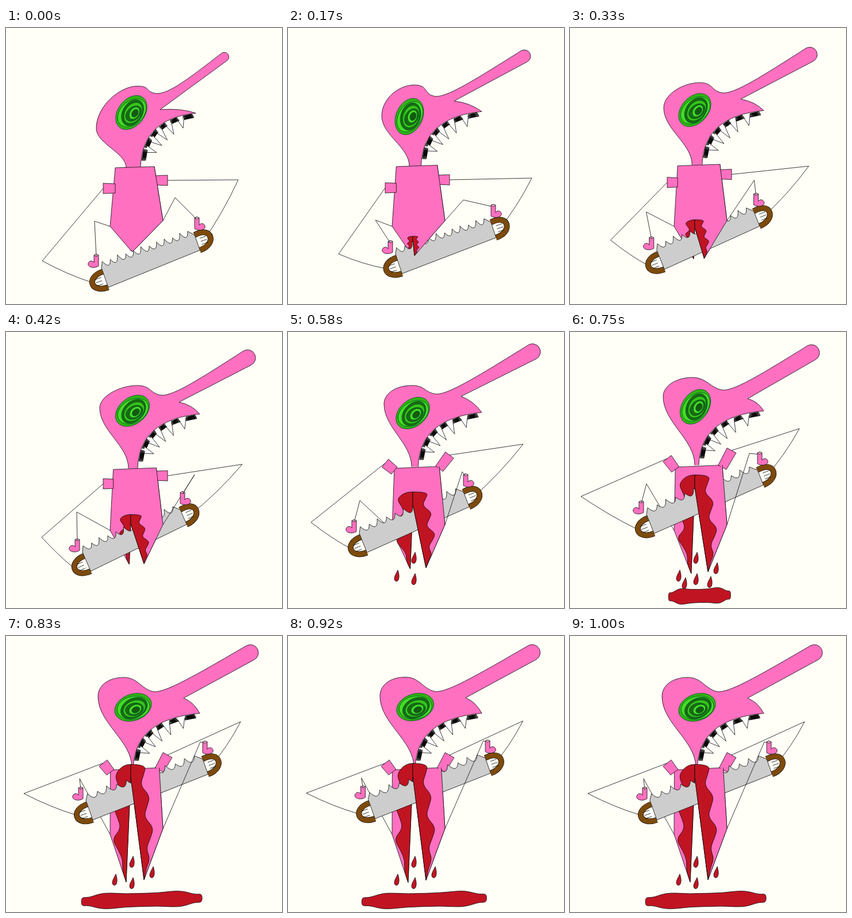
Write an HTML page that moves like this. It is 480x480 px and loops after 1.08 s.

```html
<!DOCTYPE html>
<html lang="en">
<head>
<meta charset="utf-8">
<title>Saw</title>
<style>
html, body { margin: 0; width: 100%; height: 100%; overflow: hidden; background: #fffff7; }
svg { display: block; width: 100vw; height: 100vh; }
path { stroke-linejoin: round; }
</style>
</head>
<body>
<svg id="stage" viewBox="0 0 480 480"></svg>
<script>
const PINK = '#ff70c0', RED = '#c11422', GRAY = '#cdcdcd', BROWN = '#7d4a0c';
const GREENS = ['#32b512', '#45dc25', '#1a6a12', '#38c518', '#1a6a12', '#45dc25', '#145a0e'];
const LOOP = 1080;

// Joints that move freely; everything else follows from them and from the progress of the cut.
const poses = [
  { cheek: [157, 175], crown: [228, 101], brow: [262, 114], nose: [380, 50], notch: [268, 142],
    eye: [218, 147, -52], cuff: 279, elbowL: [63, 405], elbowR: [404, 264],
    foreL: [154, 336], foreR: [294, 295], sawL: [166, 417], sawR: [328, 360] },
  { cheek: [163, 153], crown: [220, 99], brow: [257, 119], nose: [411, 49], notch: [289, 127],
    eye: [211, 154, -66], cuff: 278, elbowL: [88, 393], elbowR: [424, 261],
    foreL: [152, 334], foreR: [305, 299], sawL: [187, 393], sawR: [353, 338] },
  { cheek: [163, 132], crown: [228, 93], brow: [271, 110], nose: [420, 45], notch: [301, 122],
    eye: [220, 137, -38], cuff: 264, elbowL: [62, 357], elbowR: [411, 230],
    foreL: [123, 313], foreR: [328, 248], sawL: [133, 383], sawR: [303, 309] },
  { cheek: [167, 125], crown: [215, 93], brow: [258, 108], nose: [426, 34], notch: [301, 112],
    eye: [217, 141, -40], cuff: 228, elbowL: [40, 331], elbowR: [409, 195],
    foreL: [125, 293], foreR: [303, 243], sawL: [124, 350], sawR: [305, 278] },
  { cheek: [162, 112], crown: [213, 79], brow: [266, 101], nose: [420, 36], notch: [309, 116],
    eye: [218, 130, -56], cuff: 220, elbowL: [19, 286], elbowR: [399, 168],
    foreL: [133, 264], foreR: [312, 211], sawL: [133, 317], sawR: [326, 240] },
  { cheek: [160, 105], crown: [205, 72], brow: [258, 97], nose: [425, 29], notch: [309, 108],
    eye: [221, 124, -20], cuff: 221, elbowL: [31, 274], elbowR: [408, 149],
    foreL: [128, 248], foreR: [338, 184], sawL: [139, 286], sawR: [342, 214] }
];

// start time, position between poses
const steps = [[0, 0], [80, .5], [170, 1], [250, 1.33], [330, 1.67], [420, 2], [500, 2.5],
  [580, 3], [670, 3.5], [750, 4], [830, 5], [920, 5.07], [1000, 5]];

const lerp = (a, b, k) => Array.isArray(a) ? a.map((v, i) => lerp(v, b[i], k)) : a + (b - a) * k;
const clamp = (v, low, high) => Math.max(low, Math.min(high, v));
const add = (p, x, y) => [p[0] + x, p[1] + y];
const shift = (p, dir, k) => add(p, dir[0] * k, dir[1] * k);
const unit = (a, b) => {
  const length = Math.hypot(b[0] - a[0], b[1] - a[1]);
  return [(b[0] - a[0]) / length, (b[1] - a[1]) / length];
};

function poseAt(position) {
  const index = Math.min(Math.floor(position), poses.length - 2);
  const p = {};
  for (const key in poses[index]) {
    p[key] = lerp(poses[index][key], poses[index + 1][key], position - index);
  }
  const t = position, open = clamp(t - 1, 0, 1);
  p.neckL = [209 + 2 * t, 243 - 2.8 * t];
  p.neckR = add(p.neckL, 25 - 4.5 * t, 0);
  p.beak = [330 + 7 * Math.min(t, 1), 148 - 2.7 * t];
  p.noseRadius = Math.min(14, 8 + 3 * t);
  p.topL = [190 - 1.7 * t, 243 - 2 * t];
  p.topR = [258 + 1.7 * t, 241 - 2.4 * t];
  p.hipL = [181, 345];
  p.hipR = [273, 335];
  p.tipL = [218 - 1.8 * t, 388 + 8 * t];
  p.tipR = [220 + 20 * open, 389 + 7 * t];
  const cut = (217 - p.sawL[0]) / (p.sawR[0] - p.sawL[0]);
  p.slit = [217, lerp(p.sawL, p.sawR, cut)[1] - 13];
  p.cuffL = [169, p.cuff];
  p.cuffR = [281, p.cuff - 14];
  p.handL = add(p.sawL, -9, -11);
  p.handR = add(p.sawR, 4, -19);
  p.bleeding = Math.min(22, 8 * t);
  p.drops = t < 3 ? 0 : t < 4 ? 3 : t < 5 ? 6 : 4;
  p.spill = t < 4 ? 54 * Math.max(0, t - 3) : 54 + 51 * (t - 4);
  return p;
}

const xy = p => p[0].toFixed(1) + ' ' + p[1].toFixed(1);
const line = points => 'M' + points.map(xy).join('L');
const bezier = (...points) => 'C' + points.map(xy).join(' ');
const ink = (d, fill = 'none', width = .8, stroke = '#0a0a0a') =>
  `<path d="${d}" fill="${fill}" stroke="${stroke}" stroke-width="${width}"/>`;
const place = ([x, y], content, extra = '') =>
  `<g transform="translate(${x} ${y}) ${extra}">${content}</g>`;

// Smooth line through the midpoints, with sharp ends
function soft(points) {
  const last = points.length - 1;
  let d = 'M' + xy(points[0]);
  for (let i = 1; i < last; i++) {
    d += 'Q' + xy(points[i]) + ' ' + xy(i === last - 1 ? points[last] : lerp(points[i], points[i + 1], .5));
  }
  return d;
}

const jawControl = p => [p.neckR[0] + 2, p.beak[1] + 10];

function head(p) {
  const rise = (p.neckL[1] - p.cheek[1]) * .38, height = (p.cheek[1] - p.crown[1]) * .55;
  const run = unit(lerp(p.brow, p.notch, .5), p.nose), side = [run[1], -run[0]];
  const upper = shift(p.nose, side, p.noseRadius), lower = shift(p.nose, side, -p.noseRadius);
  const bridge = add(p.brow, 22, 0);
  return ink('M' + xy(p.neckL) +
    bezier(add(p.neckL, 0, -rise), add(p.cheek, 0, rise), p.cheek) +
    bezier(add(p.cheek, 0, -height), add(p.crown, -28, 0), p.crown) +
    bezier(add(p.crown, 25, 0), add(p.brow, -22, -3), p.brow) +
    bezier(bridge, lerp(upper, bridge, .65), upper) +
    `A${p.noseRadius} ${p.noseRadius} 0 0 1 ${xy(lower)}L${xy(p.notch)}` +
    'Q' + xy(add(lerp(p.notch, p.beak, .5), 4, -6)) + ' ' + xy(p.beak) +
    'Q' + xy(jawControl(p)) + ' ' + xy(p.neckR), PINK);
}

function mouth(p) {
  const control = jawControl(p);
  const jaw = (t, along, out) => {
    const a = lerp(p.beak, control, t), b = lerp(control, p.neckR, t), dir = unit(a, b);
    return shift(shift(lerp(a, b, t), dir, along), [dir[1], -dir[0]], out);
  };
  let marks = '';
  for (let i = 0; i < 6; i++) {
    const t = .08 + .155 * i, fang = t + .08;
    const hatch = Array.from({ length: 10 }, (_, k) =>
      jaw(t, (k % 2 ? 8 : -8) + Math.sin(k * 3 + i) * 2, 1 + k * .8));
    marks += ink(line(hatch), 'none', 1.1);
    if (i < 5) {
      marks += ink(line([jaw(fang, -6, 5), jaw(fang, 0, 16 + 12 * Math.sin(Math.PI * fang)), jaw(fang, 6, 5)]), '#fff');
    }
  }
  return marks;
}

function eye([x, y, tilt]) {
  const rings = GREENS.map((green, i) => {
    const size = 1 - i * .13, turn = Math.sin(i * 2) * 9;
    return `<ellipse cx="${i * .4}" cy="${i}" rx="${33 * size}" ry="${23 * size}" fill="${green}"
      stroke="#052" stroke-width=".8" transform="rotate(${turn})"/>`;
  });
  return place([x, y], rings.join(''), `rotate(${tilt})`);
}

function sleeve(corner, cuff) {
  const root = [corner[0], Math.max(corner[1] + 4, cuff[1])];
  const dir = unit(root, cuff), side = [-dir[1], dir[0]];
  return ink(line([shift(root, side, 8), shift(cuff, side, 9), shift(cuff, side, -9), shift(root, side, -8)]) + 'Z', PINK);
}

const arm = (cuff, elbow, hand) =>
  ink(line([cuff, elbow]) + 'Q' + xy(add(lerp(elbow, hand, .5), 3, 6)) + ' ' + xy(hand));

function hand(at, flip) {
  return place(at, ink('M-4-11Q0-14 4-11L4 8C-4 13-16 10-14 3C-12-2-6-2-4 2ZM-4-11Q0-7 4-11', PINK), `scale(${flip} 1)`);
}

function saw(p) {
  const teeth = 12, run = unit(p.sawL, p.sawR), down = [-run[1], run[0]];
  const footL = shift(p.sawL, down, 36), footR = shift(p.sawR, down, 28);
  const along = (i, height) => shift(lerp(p.sawL, p.sawR, i / teeth), down, -height);
  let blade = 'M' + xy(p.sawL);
  for (let i = 0; i < teeth; i++) {
    const peak = xy(along(i + .35, 10 + 2 * Math.sin(i * 4)));
    blade += i ? 'Q' + xy(along(i - .05, -9)) + ' ' + peak : 'L' + peak;
  }
  blade += 'L' + [p.sawR, footR, footL].map(xy).join('L') + 'Z';
  return grip(shift(p.sawL, down, 7), footL, run, -32, 0) +
    grip(p.sawR, footR, run, 32, -6) + ink(blade, GRAY);
}

function grip(top, foot, run, reach, lift) {
  const loop = line([top]) + bezier(add(shift(top, run, reach), 0, lift), shift(foot, run, reach), foot);
  const fingers = [.3, .5, .7].map(k => {
    const root = lerp(top, foot, k);
    return line([shift(root, run, reach * .55), shift(root, run, reach * .2)]);
  });
  return ink(loop, '#fffff7', 10) + ink(loop, 'none', 8.6, BROWN) + ink(fingers.join(''));
}

// A ragged band beside the cut, thinning towards the tip
function blood(slit, tip, width, side) {
  if (width < 1) return '';
  const count = 11, outer = [add(slit, 0, -width)];
  for (let i = 0; i < count; i++) {
    const k = i / count, wave = .9 + .4 * Math.sin(i * 2.1 + side);
    const point = lerp(add(slit, 0, -width), tip, k);
    outer.push(add(point, side * width * wave * Math.min(1, (1 - k) * 3), 0));
  }
  return ink(soft([...outer, tip]) + 'L' + xy(slit) + 'Z', RED);
}

function drops(count) {
  const homes = [[189, 424], [219, 430], [219, 393], [254, 411], [243, 435], [199, 437]];
  const drop = ink('M2-10C4-4 5 2 3 7C1 11-4 10-4 5C-4 0 0-5 2-10Z', RED);
  return homes.slice(0, count).map(home => place(home, drop)).join('');
}

function pool(half) {
  if (half < 1) return '';
  const power = (v, k) => Math.sign(v) * Math.abs(v) ** k;
  const center = 214 + half * .21, points = [];
  for (let i = 0; i < 60; i++) {
    const a = i / 60 * 2 * Math.PI, c = power(Math.cos(a), .6);
    points.push([center + half * c, 459 - c * half * .03 + 13 * power(Math.sin(a), .7) + 1.5 * Math.sin(a * 7)]);
  }
  return ink(line(points) + 'Z', RED);
}

function draw(p) {
  return [
    arm(p.cuffL, p.elbowL, add(p.sawL, -18, 25)),
    arm(p.cuffR, p.elbowR, add(p.sawR, 14, 12)),
    ink(line([p.hipL, p.foreL, add(p.handL, 0, -8)])),
    head(p), mouth(p), eye(p.eye),
    ink(line([p.topL, p.hipL, p.tipL, p.slit, p.tipR, p.hipR, p.topR]) + 'Z', PINK),
    sleeve(p.topL, p.cuffL), sleeve(p.topR, p.cuffR),
    blood(p.slit, p.tipL, p.bleeding, -1),
    saw(p),
    ink(line([p.slit, p.tipR, p.hipR, p.topR]), PINK),
    blood(p.slit, p.tipR, p.bleeding, 1),
    ink(line([p.hipR, p.foreR, add(p.handR, 0, -8)])),
    hand(p.handL, 1), hand(p.handR, -1),
    pool(p.spill), drops(p.drops)
  ].join('');
}

const stage = document.getElementById('stage');
const drawings = steps.map(([, position]) => draw(poseAt(position)));
const start = performance.now();
let shown = -1;

function update() {
  const time = (performance.now() - start) % LOOP;
  const current = steps.filter(([begin]) => begin <= time).length - 1;
  if (current !== shown) stage.innerHTML = drawings[shown = current];
  requestAnimationFrame(update);
}
update();
</script>
</body>
</html>
```
